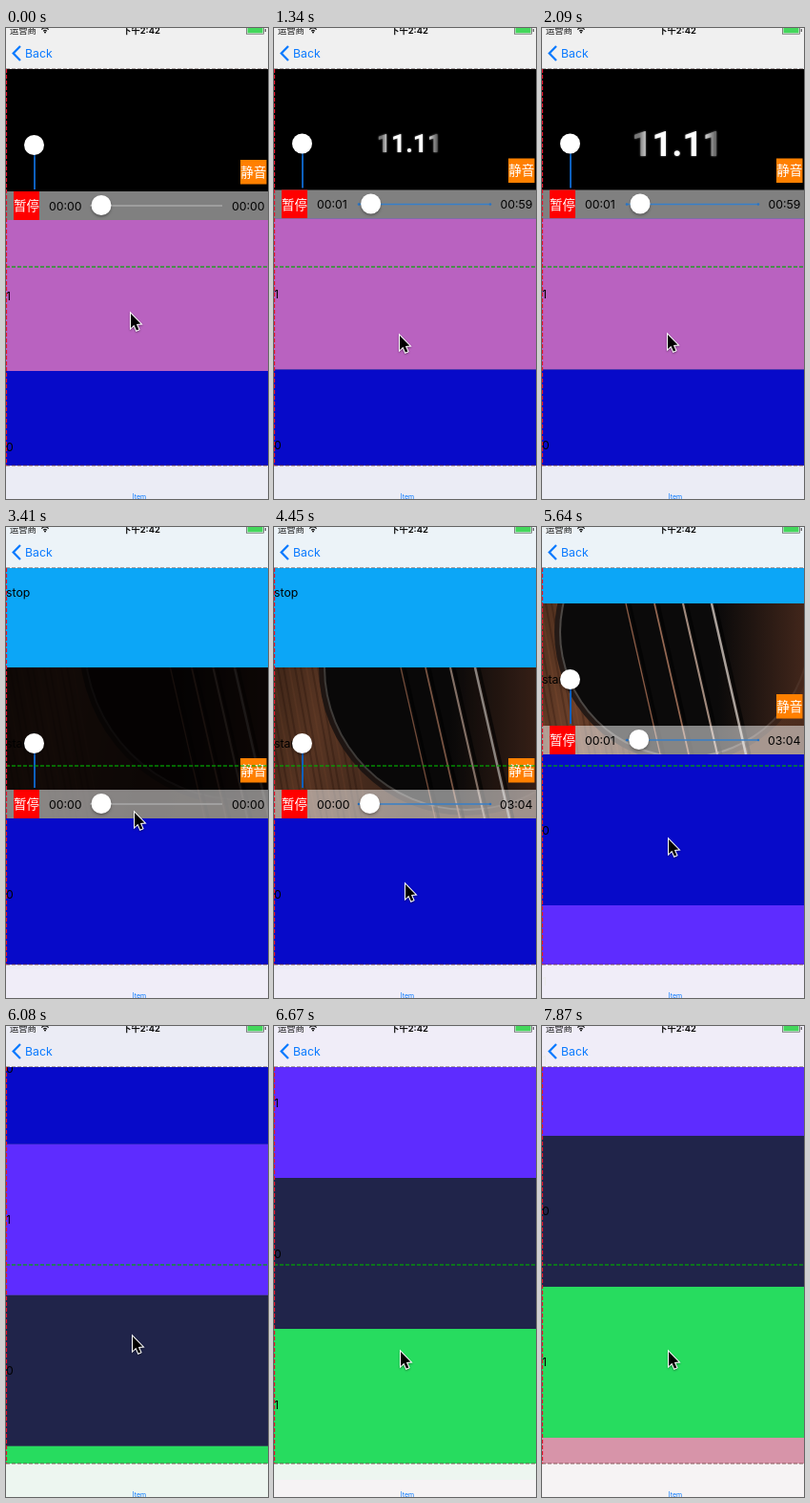
Animation, 275 px wide and 493 px high, one loop 8 s. Source, as an HTML page with a canvas:

```html
<!DOCTYPE html>
<html lang="zh">
<head>
<meta charset="utf-8">
<title>Player list</title>
<style>
html, body { margin: 0; width: 100%; height: 100%; overflow: hidden; }
canvas { display: block; width: 100vw; height: 100vh; }
</style>
</head>
<body>
<canvas id="stage" width="275" height="493"></canvas>
<script>
const ctx = document.getElementById('stage').getContext('2d');
const W = 275, H = 493, CELL = 158, LOOP = 8000, STEP = 148.5;
const TOP = 43, BOTTOM = 458, SWITCH = 19;
const BLUE = '#0a7aff';
const FONT = 'Inter, "Noto Sans CJK SC", "Noto Sans CJK", sans-serif';
const cells = [
  ['#0ca6f7', 'stop'], ['#b962c0', '1'], ['#070ac9', '0'], ['#5e2cff', '1'],
  ['#20244a', '0'], ['#27dc5f', '1'], ['#d794a9', '0']
];

// Keys are [step, value...]; values in between are linear.
const scrollKeys = [[0, 43], [7, 43], [9, 41.5], [14, 41.5], [15, 10], [16, -6], [17, -11], [37, -11], [38, -78]];
const pointerKeys = [
  [0, 131, 299], [3, 131, 320], [7, 132, 340], [9, 132, 322], [14, 132, 321], [15, 133, 299], [23, 135, 299],
  [30, 138, 374], [33, 138, 408], [37, 136, 394], [38, 133, 327], [39, 133, 305], [42, 133, 335], [44, 133, 341]
];

const clamp = v => Math.max(0, Math.min(1, v));

function at(keys, s, i = 1) {
  const n = keys.findIndex(k => k[0] > s);
  if (n < 0) return keys[keys.length - 1][i];
  const a = keys[n - 1], b = keys[n];
  return a[i] + (b[i] - a[i]) * (s - a[0]) / (b[0] - a[0]);
}

function rect(x, y, w, h, color) {
  ctx.fillStyle = color;
  ctx.fillRect(x, y, w, h);
}

function line(x1, y1, x2, y2, color, width = 1, dash = []) {
  ctx.strokeStyle = color;
  ctx.lineWidth = width;
  ctx.setLineDash(dash);
  ctx.beginPath();
  ctx.moveTo(x1, y1);
  ctx.lineTo(x2, y2);
  ctx.stroke();
  ctx.setLineDash([]);
}

function text(str, x, y, color = '#000', size = 12.3, align = 'left', weight = 400) {
  ctx.font = `${weight} ${size}px ${FONT}`;
  ctx.fillStyle = color;
  ctx.textAlign = align;
  ctx.fillText(str, x, y);
}

function disc(x, y, r, color) {
  ctx.fillStyle = color;
  ctx.beginPath();
  ctx.arc(x, y, r, 0, Math.PI * 2);
  ctx.fill();
}

function knob(x, y) {
  ctx.save();
  ctx.shadowColor = 'rgba(0,0,0,.35)';
  ctx.shadowBlur = 3;
  ctx.shadowOffsetY = 1.5;
  disc(x, y, 10.5, '#fff');
  ctx.restore();
}

function titleClip(s) {
  if (s < 5) return;
  const grow = clamp((s - 4) / 7);
  ctx.save();
  ctx.translate(142, 79);
  ctx.scale(grow, grow);
  ctx.globalAlpha = clamp((s - 4) / 5);
  const shine = ctx.createLinearGradient(-40, 0, 40, 0);
  [[0, '#777'], [.15, '#fff'], [.8, '#fff'], [.9, '#bbb'], [1, '#666']].forEach(c => shine.addColorStop(...c));
  ctx.shadowColor = 'rgba(255,255,255,.6)';
  ctx.shadowBlur = 2;
  ctx.font = '700 37px Roboto, sans-serif';
  ctx.textAlign = 'center';
  ctx.fillStyle = shine;
  ctx.fillText('11.11', 0, 13);
  ctx.restore();
}

function guitarClip(s) {
  const pan = (s - 30) / 8;
  const cx = 202 - 52 * pan, cy = 30 * pan, r = 150 - 18 * pan;
  const wood = ctx.createLinearGradient(0, 0, W, 60);
  [[0, '#50301e'], [.2, '#6b402a'], [.6, '#432a1e'], [1, '#55331f']].forEach(c => wood.addColorStop(...c));
  rect(0, 0, W, CELL, wood);
  for (let i = 0; i < 16; i++) {
    line(i * 6 - 20, 0, i * 6 + 8, CELL, i % 3 ? 'rgba(20,8,4,.22)' : 'rgba(150,90,55,.18)', 2);
  }
  disc(cx, cy, r + 5, '#251a16');
  disc(cx, cy, r, '#4c4845');
  disc(cx, cy, r - 2, '#0b0a0a');
  const side = ctx.createLinearGradient(185, 0, W, 0);
  side.addColorStop(0, 'rgba(75,43,30,0)');
  side.addColorStop(1, 'rgba(75,43,30,.85)');
  rect(185, 0, 90, CELL, side);
  ['#8b5c46', '#966953', '#a18a7d', '#aaa19b'].forEach((color, i) => {
    const x = 133 + i * 26 - pan * (45 - i * 4);
    line(x + 4, 0, x + 40, CELL, 'rgba(0,0,0,.6)', 3);
    line(x, 0, x + 36, CELL, color, 1.3 + i * .4);
  });
  rect(0, 0, W, CELL, `rgba(4,2,2,${1 - clamp(.05 + (s - 22) * .095)})`);
}

function player(s, y) {
  const second = s >= SWITCH;
  const loaded = second ? s >= 26 : s >= 4;
  const elapsed = second ? s >= 33 : s >= 9;
  const total = loaded ? (second ? '03:04' : '00:59') : '00:00';
  const knobX = second ? 100 + clamp((s - 26) / 12) * 1.7 : 100 + clamp((s - 3) / 11) * 3;

  ctx.save();
  ctx.translate(0, y);
  ctx.beginPath();
  ctx.rect(0, 0, W, CELL);
  ctx.clip();
  rect(0, 0, W, CELL, '#000');
  if (second) guitarClip(s); else titleClip(s);
  text('start', 0, 83.5);

  rect(0, 128, W, 30, 'rgba(255,255,255,.5)');
  rect(8, 128, 27, 30, '#f00');
  text('暂停', 21.5, 148, '#fff', 13.5, 'center');
  text(elapsed ? '00:01' : '00:00', 45, 147.5);
  text(total, 271.5, 147.5, '#000', 12.3, 'right');
  line(88, 143, 227, 143, loaded ? '#377fc9' : '#a8a8a8', 1.5);
  if (loaded) {
    disc(89, 143, 1.3, '#2873c4');
    disc(227, 143, 1.3, '#2873c4');
  }
  knob(knobX, 142.5);

  line(30, 80, 30, 126, '#0d60bd', 2);
  knob(29.5, 79.5);
  rect(246, 95, 27.5, 25.5, '#ff8000');
  text('静音', 259.7, 112.5, '#fff', 13.5, 'center');
  ctx.restore();
}

function bars() {
  const veil = 'rgba(248,248,248,.95)';
  rect(0, 0, W, TOP, veil);
  rect(0, BOTTOM, W, H - BOTTOM, veil);

  text('运营商', 4, 6, '#111', 9.3);
  ctx.strokeStyle = '#111';
  ctx.lineWidth = 1.2;
  [2.5, 5].forEach(r => {
    ctx.beginPath();
    ctx.arc(41, 5, r, -Math.PI * .76, -Math.PI * .24);
    ctx.stroke();
  });
  disc(41, 4.5, 1, '#111');
  text('下午2:42', 142, 6, '#111', 9.3, 'center', 700);
  ctx.strokeStyle = '#555';
  ctx.lineWidth = .7;
  ctx.strokeRect(252.5, -2, 18, 8.2);
  rect(253.5, -1, 16, 6.3, '#43d75b');
  rect(271.7, 1, 1.2, 3, '#555');

  ctx.strokeStyle = BLUE;
  ctx.lineWidth = 2.3;
  ctx.beginPath();
  ctx.moveTo(15, 19);
  ctx.lineTo(7.7, 26.5);
  ctx.lineTo(15, 34);
  ctx.stroke();
  text('Back', 20, 31, BLUE);
  text('Item', 140, 492.5, BLUE, 7, 'center');
}

function guides() {
  const dash = [4, 2];
  line(0, 250, W, 250, 'rgba(0,170,0,.8)', 1.3, dash);
  line(0, 42.7, W, 42.7, 'rgba(70,50,50,.65)', .8, dash);
  line(0, 458, W, 458, 'rgba(110,60,60,.8)', 1, dash);
  line(.5, TOP, .5, BOTTOM, '#e5132b', 1.2, dash);
}

function pointer(x, y) {
  const shape = [[0, 0], [0, 15], [3.4, 11.8], [6, 17.6], [8.4, 16.5], [5.9, 10.9], [10.4, 10.6]];
  ctx.save();
  ctx.translate(x, y);
  ctx.beginPath();
  shape.forEach(p => ctx.lineTo(...p));
  ctx.closePath();
  ctx.shadowColor = 'rgba(0,0,0,.4)';
  ctx.shadowBlur = 2;
  ctx.shadowOffsetY = 1;
  ctx.strokeStyle = '#fff';
  ctx.lineWidth = 2;
  ctx.stroke();
  ctx.shadowColor = 'transparent';
  ctx.fillStyle = '#000';
  ctx.fill();
  ctx.restore();
}

function scrollTop(s) {
  // After the flick the list coasts with exponential deceleration.
  if (s <= 38) return at(scrollKeys, s);
  return -78 - 442.8 * (1 - Math.exp(-(s - 38) * STEP / 467));
}

function draw(now) {
  const s = Math.floor((now % LOOP + 15) / STEP);
  const top = scrollTop(s);
  rect(0, 0, W, H, '#666');
  cells.forEach(([color, label], i) => {
    const y = top + i * CELL;
    if (y > H || y + CELL < 0) return;
    rect(0, y, W, CELL, color);
    text(label, 0, y + 83.5);
    if (i === (s >= SWITCH ? 1 : 0)) player(s, y);
  });
  bars();
  guides();
  pointer(at(pointerKeys, s), at(pointerKeys, s, 2));
}

const start = performance.now();
function tick() {
  draw(performance.now() - start);
  requestAnimationFrame(tick);
}
tick();
</script>
</body>
</html>
```
